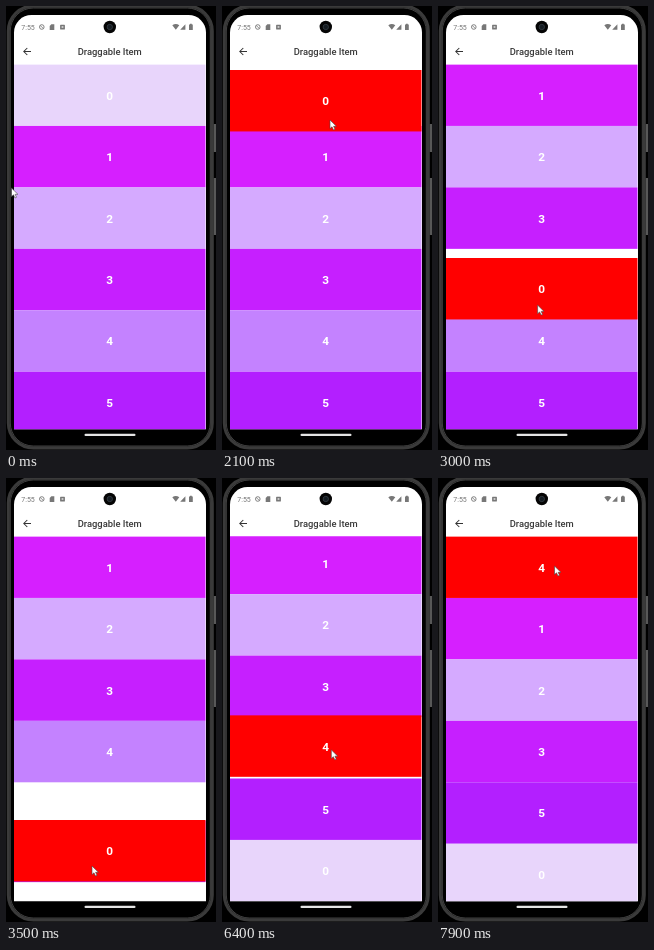
Recreate the animation shown at these times as an HTML page. Size 210 px wide and 444 px high, loop 8 s.

```html
<!DOCTYPE html>
<html lang="en">
<head>
<meta charset="utf-8">
<title>Draggable Item</title>
<style>
  html, body { margin: 0; width: 100%; height: 100%; overflow: hidden; background: #000; }
  svg { display: block; width: 210px; height: 444px; }
  text { font-family: Roboto, Inter, sans-serif; text-anchor: middle; }
  #list text { font-size: 11.8px; font-weight: 700; fill: #fff; }
</style>
</head>
<body>
<svg viewBox="0 0 210 444">
  <defs><clipPath id="viewport"><rect x="8" y="58.3" width="191.7" height="364.9"/></clipPath></defs>

  <!-- Phone body and side buttons -->
  <rect width="210" height="444" fill="#000"/>
  <path d="M208.8 118V146M208.8 172V229" stroke="#585858" stroke-width="2.6"/>
  <rect x="2.3" y="0" width="204" height="442" rx="25" fill="#000" stroke="#3a3a3a" stroke-width="3"/>
  <rect x="4.3" y="2" width="200" height="438" rx="23" fill="none" stroke="#5c5c5c" stroke-width=".7"/>
  <path d="M8 423.2V26.5a17.5 17.5 0 0 1 17.5-17.5H182.5a17.5 17.5 0 0 1 17.5 17.5V423.2Z" fill="#fff"/>
  <rect x="78.5" y="427.8" width="51" height="2.2" rx="1.1" fill="#e4e4e4"/>

  <!-- Status bar -->
  <g fill="#777">
    <text x="22" y="23.6" font-size="7">7:55</text>
    <circle cx="35.8" cy="21" r="2.3" fill="none" stroke="#777" stroke-width=".9"/>
    <path d="M34.2 19.4l3.2 3.2" stroke="#777" stroke-width=".8"/>
    <path d="M43.7 20l1.6-1.7h3v5.6h-4.6Z"/>
    <rect x="54.1" y="18.7" width="4.8" height="4.8" rx=".6"/>
    <path d="M55.6 21h1.8" stroke="#fff" stroke-width="1.2"/>
    <path d="M166.3 19.3q3.5-2.6 7 0l-3.5 4.4Z M174.2 23.8l5.2-5.5v5.5Z"/>
    <path d="M183 18.6h1v-.8h1.8v.8h1v5.4H183Z"/>
  </g>
  <circle cx="103.8" cy="21" r="6.2" fill="#050505"/>
  <circle cx="103.8" cy="21" r="2.7" fill="#151c22" stroke="#3b444b" stroke-width=".7"/>

  <!-- App bar -->
  <path d="M25 45.5H18M21.3 42l-3.5 3.5 3.5 3.5" fill="none" stroke="#333" stroke-width="1.05"/>
  <text x="103.7" y="49.1" font-size="9.4" font-weight="500" fill="#3a3a3a">Draggable Item</text>

  <g id="list" clip-path="url(#viewport)"></g>
  <path id="cursor" d="M0 0V8.6L2 6.8L3.5 10L5 9.3L3.6 6.3H6.4Z" fill="#fff" stroke="#444" stroke-width=".6"/>
</svg>
<script>
const LOOP = 8000, STEP = 100, SHIFT_TIME = 250;
const TOP = 58.5, ROW = 61.45, LEAD = 12;
const COLORS = ['#e8d5fb', '#d61fff', '#d5aaff', '#c61fff', '#c482ff', '#b31fff'];
const RED = '#ff0000';
const MAX_SCROLL = COLORS.length * ROW - 364.9;

// Each drag: held item, hold time, slots, and key points (time, row top, pointer x, pointer y)
const DRAGS = [
  { item: 0, start: 1500, end: 4100, from: 0, to: 5, scroll: 0, path: [
    [2000, TOP, 107, 109], [2100, 64, 108, 114], [2600, 180, 110.5, 228],
    [3500, 342, 86, 388], [3700, 362, 86, 408]] },
  { item: 4, start: 5800, end: LOOP, from: 3, to: 0, scroll: MAX_SCROLL, path: [
    [6350, 239, 108.5, 276], [6930, 220, 118, 228], [7100, 161, 120.5, 174], [7400, TOP, 116.5, 88]] }
];
const POINTER = [
  [0, 0, 5.5, 182], [700, 0, 107, 109], ...DRAGS[0].path,
  [4000, 0, 86, 408], [4600, 0, 190, 299], [4900, 0, 108.5, 280], [5100, 0, 108.5, 276], ...DRAGS[1].path
];

const smooth = v => {
  const p = Math.max(0, Math.min(1, v));
  return p * p * (3 - 2 * p);
};

function track(keys, t, column) {
  const next = keys.findIndex(key => key[0] > t);
  if (next === 0) return keys[0][column];
  if (next < 0) return keys[keys.length - 1][column];
  const a = keys[next - 1], b = keys[next];
  return a[column] + (b[column] - a[column]) * (t - a[0]) / (b[0] - a[0]);
}

// A row gives way once the leading edge of the dragged row nears its middle.
function crossing({ start, end, scroll, path }, slot, dir) {
  const top = TOP + ROW * slot - scroll;
  const limit = top - dir * (ROW / 2 + LEAD) + (dir < 0 ? -ROW / 2 : 0) * 0 - (dir > 0 ? 0 : 0);
  const edge = dir > 0 ? limit : top + ROW / 2 + LEAD;
  let t = start;
  while (t < end && (track(path, t, 1) - edge) * dir < 0) t += 4;
  return t;
}

// Replay the drags to learn when each row moves by one slot.
const order = COLORS.map((_, i) => i);
const moves = COLORS.map(() => []);
for (const drag of DRAGS) {
  const dir = Math.sign(drag.to - drag.from);
  for (let slot = drag.from + dir; slot !== drag.to + dir; slot += dir) {
    moves[order[slot]].push({ at: crossing(drag, slot, dir), by: -dir, over: SHIFT_TIME });
  }
  moves[drag.item].push({ at: drag.end, by: drag.to - drag.from, over: 1 });
  order.splice(drag.to, 0, ...order.splice(drag.from, 1));
}

function make(tag, attrs, parent) {
  const node = document.createElementNS('http://www.w3.org/2000/svg', tag);
  for (const name in attrs) node.setAttribute(name, attrs[name]);
  return parent.appendChild(node);
}

const list = document.getElementById('list');
const cursor = document.getElementById('cursor');
const rows = COLORS.map((_, i) => {
  const group = make('g', {}, list);
  const box = make('rect', { x: 8, width: 191.7, height: ROW }, group);
  make('text', { x: 103.7, y: 35.2 }, group).textContent = i;
  return { group, box };
});

const slotOf = (item, t) => moves[item].reduce(
  (slot, { at, by, over }) => slot + by * smooth((t - at) / over), item);
const scrollAt = t => MAX_SCROLL * (smooth((t - 3650) / 200) - smooth((t - 7450) / 200));

let lifted;
function draw(t) {
  const drag = DRAGS.find(d => t >= d.start && t < d.end);
  rows.forEach(({ group, box }, i) => {
    const held = drag && drag.item === i;
    const y = held ? track(drag.path, t, 1) : TOP + ROW * slotOf(i, t) - scrollAt(t);
    group.setAttribute('transform', `translate(0 ${y.toFixed(2)})`);
    box.setAttribute('fill', held ? RED : COLORS[i]);
  });
  if (drag && drag !== lifted) list.appendChild(rows[drag.item].group);
  lifted = drag;
  cursor.setAttribute('transform', `translate(${track(POINTER, t, 2)} ${track(POINTER, t, 3)})`);
}

const began = performance.now();
function frame() {
  const t = (performance.now() - began) % LOOP;
  draw(Math.floor(t / STEP) * STEP);
  requestAnimationFrame(frame);
}
frame();
</script>
</body>
</html>
```
